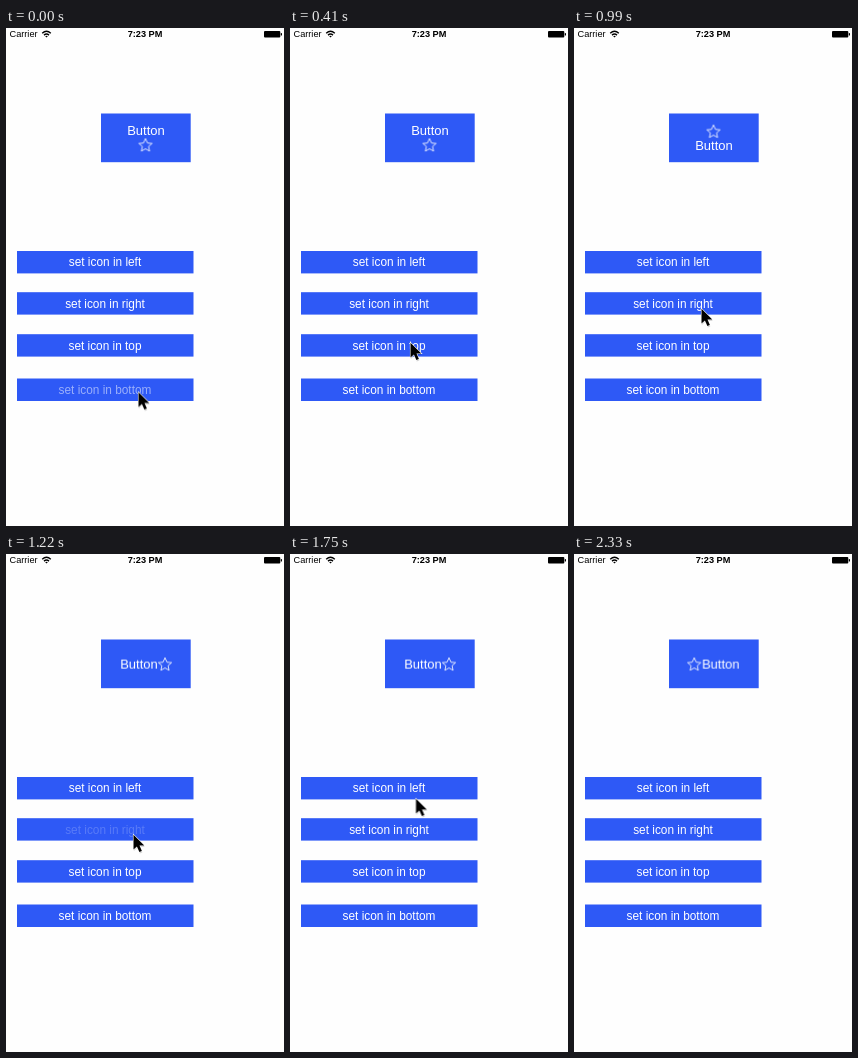
Write an HTML page that moves like this. It is 278 by 498 pixels and loops after 2.62 s.

```html
<!DOCTYPE html>
<html lang="en">
<head>
<meta charset="utf-8">
<title>Button icon positions</title>
<style>
  html, body { margin: 0; width: 100%; height: 100%; overflow: hidden; background: #fefefe; }
  svg { display: block; width: 278px; height: 498px; }
  text { font-family: "Liberation Sans", Arial, sans-serif; }
  .bar { fill: #2e59f6; }
  .status { font-size: 9.2px; }
  .label { font-size: 11.85px; fill: #fff; text-anchor: middle; }
  .title { font-size: 13px; fill: #fff; text-anchor: middle; }
  .star { fill: none; stroke: #fff; stroke-opacity: .85; stroke-width: 1; stroke-linejoin: round; }

  /* The loop is 45 equal ticks; every stretch is stepped tick by tick. */
  .title, .star, .label, .cursor { animation: 2620ms step-end -6ms infinite; }
  .title { animation-name: title; }
  .star { animation-name: star; }
  .cursor { animation-name: cursor; }
  .bottom { animation-name: fade-bottom; }
  .top { animation-name: fade-top; }
  .right { animation-name: fade-right; }
  .left { animation-name: fade-left; }

  @keyframes title {
    0% { transform: translate(140px, 107px); }
    24.444% { transform: translate(140px, 122px); }
    46.667% { transform: translate(133px, 114.6px); }
    73.333%, 100% { transform: translate(146.7px, 114.6px); }
  }
  @keyframes star {
    0% { transform: translate(139.5px, 117.2px); }
    24.444% { transform: translate(139.5px, 103.6px); }
    46.667% { transform: translate(159px, 110.4px); }
    73.333%, 100% { transform: translate(120.2px, 110.4px); }
  }
  @keyframes fade-bottom {
    0% { opacity: .52; animation-timing-function: steps(3); }
    6.667%, 100% { opacity: 1; }
  }
  @keyframes fade-top {
    0% { opacity: 1; }
    20% { opacity: .2; }
    24.444% { opacity: .2; animation-timing-function: steps(5); }
    35.556%, 100% { opacity: 1; }
  }
  @keyframes fade-right {
    0% { opacity: 1; }
    44.444% { opacity: .2; }
    46.667% { opacity: .2; animation-timing-function: steps(5); }
    57.778%, 100% { opacity: 1; }
  }
  @keyframes fade-left {
    0% { opacity: 1; }
    68.889% { opacity: .2; }
    73.333% { opacity: .2; animation-timing-function: steps(5); }
    84.444%, 100% { opacity: 1; }
  }
  @keyframes cursor {
    0% { transform: translate(132px, 363.5px); opacity: 1; animation-timing-function: steps(7); }
    15.556% { transform: translate(120px, 314px); opacity: 1; }
    24.444% { transform: translate(120px, 314px); opacity: 1; animation-timing-function: steps(2); }
    28.889% { transform: translate(124px, 292.5px); opacity: 1; animation-timing-function: steps(4); }
    37.778% { transform: translate(127px, 280px); opacity: 1; }
    46.667% { transform: translate(127px, 280px); opacity: 1; animation-timing-function: steps(5); }
    57.778% { transform: translate(125px, 249.5px); opacity: 1; animation-timing-function: steps(8); }
    75.556% { transform: translate(126px, 238.5px); opacity: 1; animation-timing-function: steps(4); }
    84.444% { transform: translate(244px, 473px); opacity: 1; }
    86.667% { transform: translate(247px, 481px); opacity: 1; }
    88.889%, 100% { transform: translate(247px, 498px); opacity: 0; }
  }
</style>
</head>
<body>
<svg viewBox="0 0 278 498">
  <text class="status" x="3.5" y="9.4">Carrier</text>
  <g fill="none" stroke="#000" stroke-width="1.4">
    <path d="M36.2 5.2Q40.5 1.4 44.8 5.2M38 7.1Q40.5 5 43 7.1"/>
    <path d="M39.2 8.2Q40.5 7.2 41.8 8.2L40.5 9.6Z" fill="#000" stroke="none"/>
  </g>
  <text class="status" x="139" y="9.4" font-weight="bold" text-anchor="middle">7:23 PM</text>
  <rect x="258" y="3" width="16.3" height="6.4" rx="1"/>
  <rect x="274.8" y="5" width="1.2" height="2.4" rx=".5"/>

  <rect class="bar" x="95" y="85.5" width="89.7" height="48.7"/>
  <text class="title">Button</text>
  <path class="star" d="M0-6.7L2-2.2 6.6-1.8 3.1 1.3 4.1 5.9 0 3.5-4.1 5.9-3.1 1.3-6.6-1.8-2-2.2Z"/>

  <g class="bar">
    <rect x="11" y="223" width="176.5" height="22.4"/>
    <rect x="11" y="264.2" width="176.5" height="22.4"/>
    <rect x="11" y="306.2" width="176.5" height="22.4"/>
    <rect x="11" y="350.5" width="176.5" height="22.5"/>
  </g>
  <text class="label left" x="99" y="238.3">set icon in left</text>
  <text class="label right" x="99" y="279.6">set icon in right</text>
  <text class="label top" x="99" y="321.6">set icon in top</text>
  <text class="label bottom" x="99" y="366">set icon in bottom</text>

  <g class="cursor">
    <path d="M.8 1.8V17L4.2 13.8 6.8 19.4 9.4 18.2 7 12.8H11.8Z" fill="#000" opacity=".2"/>
    <path d="M.5.8V15.6L3.9 12.4 6.4 18 8.9 16.9 6.5 11.4H11.3Z" stroke="#fff" stroke-width="1.1" paint-order="stroke"/>
  </g>
</svg>
</body>
</html>
```
